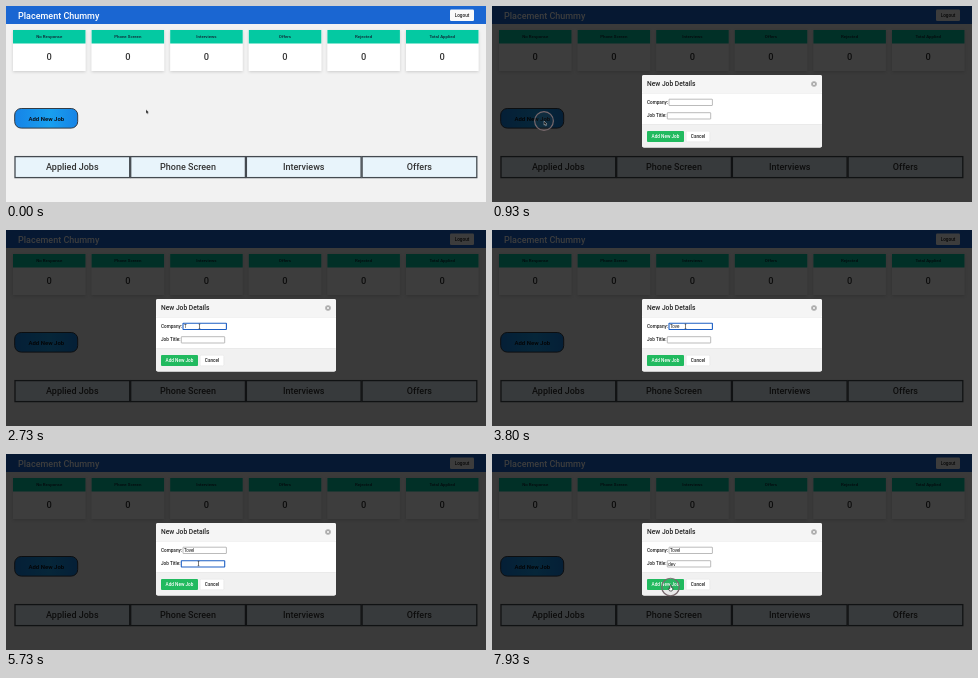
Animation of 480 by 196 pixels, one loop 8000 ms. Source, as an HTML page:

```html
<!DOCTYPE html>
<html lang="en">
<head>
<meta charset="utf-8">
<title>Job tracker</title>
<style>
html, body { margin: 0; width: 480px; height: 196px; overflow: hidden; background: #f2f2f2; }
svg { display: block; }
text { font-family: Roboto, "Open Sans", sans-serif; font-weight: 500; }
.typed { font-family: "Liberation Sans", Arial, sans-serif; font-weight: 400; }
</style>
</head>
<body>
<svg id="stage" width="480" height="196" viewBox="0 0 480 196">
  <defs>
    <linearGradient id="blue"><stop stop-color="#1683e6"/><stop offset=".55" stop-color="#18a0f0"/><stop offset="1" stop-color="#1683e6"/></linearGradient>
    <filter id="soft" x="-10%" y="-20%" width="120%" height="150%"><feDropShadow dx="0" dy="1" stdDeviation="1.4" flood-opacity=".16"/></filter>
  </defs>
  <g id="page"></g>
  <rect id="dim" width="480" height="196" fill="#000" opacity=".76"/>
  <g id="modal"></g>
  <circle id="ring" fill="#888" fill-opacity=".08" stroke="#77686c" stroke-width="1.2"/>
  <g id="mouse">
    <path id="arrow" d="M0 0V4.2L1 3.3L1.7 4.8L2.4 4.5L1.8 3.1H3Z" fill="#111" stroke="#fff" stroke-width=".35"/>
    <path id="beam" d="M-.8-2.2H.8M0-2.2V2.2M-.8 2.2H.8" fill="none" stroke="#222" stroke-width=".6"/>
    <path id="hand" d="M-.6-1.5Q0-2.2.6-1.5V.2L2.2.8V2.4L1.5 4H-.8L-2.2 1.6L-1.5 1L-.6 1.7Z" fill="#fff" stroke="#111" stroke-width=".6"/>
  </g>
</svg>
<script>
const $ = id => document.getElementById(id);

function add(parent, tag, attrs, content = '') {
  const el = document.createElementNS('http://www.w3.org/2000/svg', tag);
  for (const key in attrs) el.setAttribute(key, attrs[key]);
  el.textContent = content;
  return parent.appendChild(el);
}
const box = (parent, x, y, width, height, fill, more) =>
  add(parent, 'rect', { x, y, width, height, fill, ...more });
const label = (parent, x, y, size, content, more) =>
  add(parent, 'text', { x, y, 'font-size': size, fill: '#222', ...more }, content);
const mid = { 'text-anchor': 'middle' };

function buildPage(g) {
  box(g, 0, 0, 480, 196, '#f2f2f2');
  box(g, 0, 0, 480, 18, '#1a66d2');
  label(g, 12, 12.6, 9, 'Placement Chummy', { fill: '#fff' });
  box(g, 444, 3.5, 24, 11.5, '#fafafa', { rx: 1.2 });
  label(g, 456, 11, 4.67, 'Logout', mid);

  ['No Response', 'Phone Screen', 'Interviews', 'Offers', 'Rejected', 'Total Applied'].forEach((name, i) => {
    const x = 7 + i * 78.6;
    box(g, x, 24, 72.5, 41, '#fff', { filter: 'url(#soft)' });
    box(g, x, 24, 72.5, 13.5, '#04c9a2');
    label(g, x + 36.2, 32, 4.4, name, { ...mid, fill: '#123' });
    label(g, x + 36.2, 54.2, 9.3, '0', { ...mid, fill: '#333', 'font-weight': 400 });
  });

  box(g, 8.7, 102.5, 63, 19.6, 'url(#blue)', { rx: 6.5, stroke: '#333b44', 'stroke-width': 1 });
  label(g, 40.3, 114.7, 6, 'Add New Job', { ...mid, fill: '#0b1520', style: 'font-weight:700' });

  ['Applied Jobs', 'Phone Screen', 'Interviews', 'Offers'].forEach((name, i) => {
    const x = 9 + i * 115.7;
    box(g, x, 150.6, 114.7, 21, '#e8f4fb', { stroke: '#444a50', 'stroke-width': 1.3 });
    label(g, x + 57.3, 164.2, 9, name, { ...mid, fill: '#333' });
  });
}

function buildField(g, x, y) {
  const frame = box(g, x, y, 43.4, 6.3, '#fff', { rx: .4 });
  const text = label(g, x + 1, y + 4.9, 4.44, '', { class: 'typed', fill: '#111' });
  return { frame, text };
}

function buildModal(g) {
  box(g, 150, 69, 180, 72.5, '#fff', { rx: 2 });
  box(g, 150, 69, 180, 18, '#f5f5f5', { rx: 2 });
  box(g, 150, 118, 180, 23.5, '#f1f1f1', { rx: 2 });
  box(g, 150, 87, 180, .4, '#ddd');
  box(g, 150, 118, 180, .4, '#ddd');
  label(g, 155, 80.2, 6.67, 'New Job Details');
  add(g, 'circle', { cx: 322, cy: 78, r: 2.8, fill: '#aaa' });
  add(g, 'path', { d: 'M320.8 76.8l2.4 2.4m0-2.4l-2.4 2.4', stroke: '#fff', 'stroke-width': .7 });
  label(g, 155, 97.8, 4.67, 'Company:');
  label(g, 155, 111.2, 4.67, 'Job Title:');
  box(g, 155, 125, 37, 11, '#21ba5f', { rx: 1 });
  label(g, 173.5, 132.2, 4.67, 'Add New Job', { ...mid, fill: '#fff' });
  box(g, 194.2, 125.2, 23.6, 10.6, '#fff', { rx: 1, stroke: '#ddd', 'stroke-width': .4 });
  label(g, 206, 132.2, 4.67, 'Cancel', mid);
  return [buildField(g, 177, 93.2), buildField(g, 175.3, 106.7)];
}

buildPage($('page'));
const [company, job] = buildModal($('modal'));

const LOOP = 8000, TICK = 1000 / 15;
const OPEN = 930;
// start, end, from, to
const moves = [
  [0, 730, [140, 103.5], [52, 115]],
  [1400, 1530, [52, 115], [193.5, 96.3]],
  [4330, 4730, [193.5, 96.3], [192.5, 109.5]],
  [6600, 7400, [192.5, 109.5], [178.5, 133]]
];
// start, end of each click ring
const clicks = [[870, 1330], [1730, 2070], [4930, 5270], [7930, 8270]];
const companyKeys = [2730, 3000, 3330, 3800, 4000];
const jobKeys = [5930, 6130, 6400];

const clamp = v => Math.max(0, Math.min(1, v));
const ease = u => u * u * (3 - 2 * u);
const typed = (word, keys, t) => word.slice(0, keys.filter(k => t >= k).length);
const show = (el, on) => el.setAttribute('visibility', on ? 'visible' : 'hidden');

function mouseAt(t) {
  let pos = moves[0][2];
  for (const [start, end, from, to] of moves) {
    if (t < start) break;
    const u = ease(clamp((t - start) / (end - start)));
    pos = from.map((v, i) => v + (to[i] - v) * u);
  }
  return pos;
}

function cursorAt(x, y, open) {
  const inside = (l, top, r, b) => x > l && x < r && y > top && y < b;
  if (!open) return inside(8, 102, 72, 122) ? 'hand' : 'arrow';
  if (inside(177, 93, 220, 100) || inside(175, 106, 219, 113)) return 'beam';
  return inside(155, 125, 192, 136) || inside(194, 125, 218, 136) ? 'hand' : 'arrow';
}

function setField({ frame, text }, value, focus) {
  text.textContent = value;
  frame.setAttribute('stroke', focus ? '#1d5fc4' : '#777');
  frame.setAttribute('stroke-width', focus ? 1.1 : .5);
}

function draw(now) {
  const t = Math.floor((now % LOOP + 4) / TICK) * TICK + 4;
  const open = t >= OPEN;
  show($('dim'), open);
  show($('modal'), open);
  setField(company, typed('Tovel', companyKeys, t), t >= 1730 && t < 4930);
  setField(job, typed('dev', jobKeys, t), t >= 4930 && t < 7930);

  const [x, y] = mouseAt(t);
  $('mouse').setAttribute('transform', `translate(${x} ${y})`);
  const kind = cursorAt(x, y, open);
  for (const id of ['arrow', 'beam', 'hand']) show($(id), id === kind);

  const click = clicks.find(([start, end]) => t >= start && t < end);
  const ring = $('ring');
  show(ring, click);
  if (click) {
    ring.setAttribute('cx', x);
    ring.setAttribute('cy', y);
    ring.setAttribute('r', 8.7 + clamp((t - click[0]) / 70) * .7);
    ring.setAttribute('opacity', clamp((click[1] - t) / 130));
  }
}

const began = performance.now();
function tick() {
  draw(performance.now() - began);
  requestAnimationFrame(tick);
}
tick();
</script>
</body>
</html>
```
